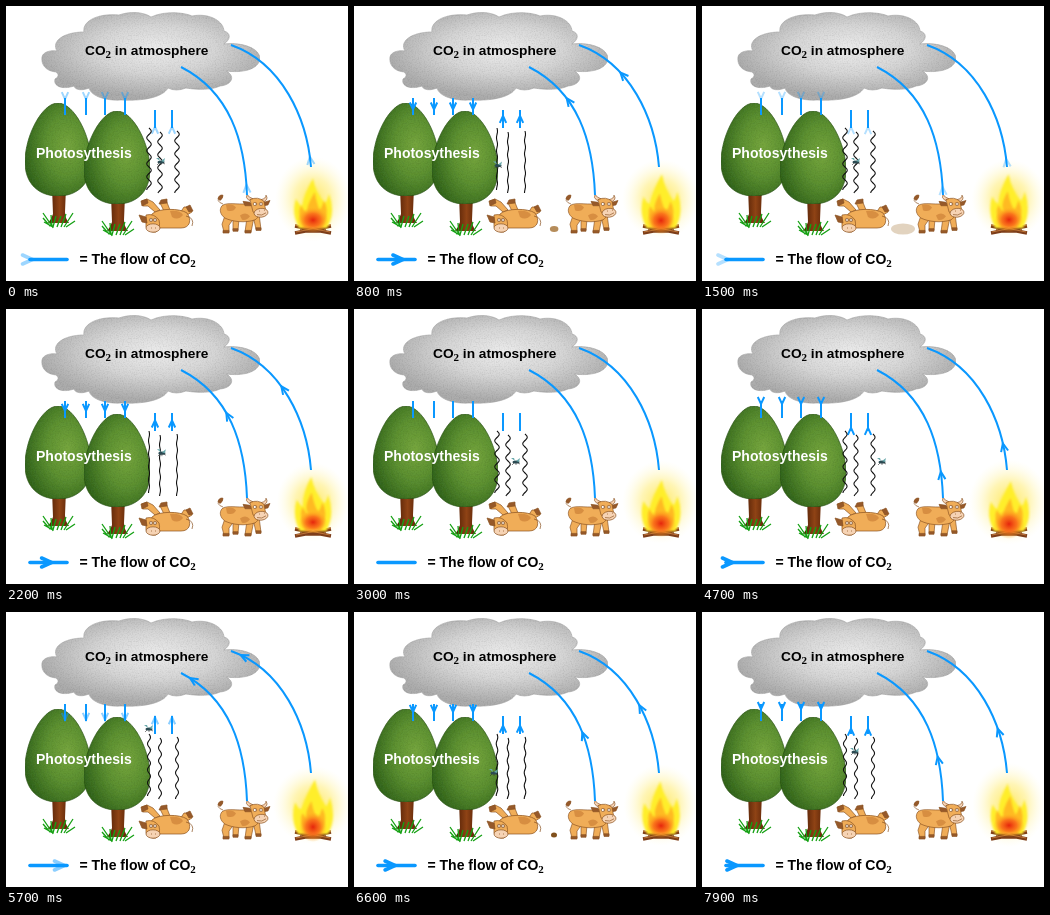
Animation, 342 px wide and 275 px high, one loop 8000 ms. Source, as an HTML page:

```html
<!DOCTYPE html>
<html lang="en">
<head>
<meta charset="utf-8">
<title>Carbon cycle</title>
<style>
html, body { margin: 0; width: 100%; height: 100%; overflow: hidden; background: #fff; }
svg { display: block; width: 342px; height: 275px; }
text { font: bold 14px "Liberation Sans", Arial, sans-serif; }
.sub { font: bold 11px "Liberation Serif", Times, serif; }
.flow, .head { fill: none; stroke: #0a98ff; stroke-width: 2; }
.wide { stroke-width: 3.6; stroke-linecap: round; }
.wave { fill: none; stroke: #111; stroke-width: 1.1; }
.cow { fill: #f0ad58; stroke: #8a5220; stroke-width: .7; stroke-linejoin: round; }
.pale { fill: #f6d3b4; }
.dark { fill: #96592a; }
.spot { fill: #cc8038; stroke: none; opacity: .7; }
.grass { fill: none; stroke: #14a012; stroke-width: 1.3; }
</style>
</head>
<body>
<svg viewBox="0 0 342 275">
  <defs>
    <radialGradient id="gray" cx=".52" cy=".42" r=".54">
      <stop offset="0" stop-color="#ececec"/><stop offset=".5" stop-color="#d6d6d6"/><stop offset="1" stop-color="#acacac"/>
    </radialGradient>
    <radialGradient id="leaf" cx=".64" cy=".46" r=".66">
      <stop offset="0" stop-color="#76a63e"/><stop offset=".5" stop-color="#5c9032"/><stop offset="1" stop-color="#34661f"/>
    </radialGradient>
    <linearGradient id="bark">
      <stop offset="0" stop-color="#4c1d05"/><stop offset=".55" stop-color="#8f4315"/><stop offset="1" stop-color="#5a2408"/>
    </linearGradient>
    <radialGradient id="glow">
      <stop offset="0" stop-color="#ffe860"/><stop offset=".5" stop-color="#fff3a8" stop-opacity=".85"/><stop offset="1" stop-color="#fffbe0" stop-opacity="0"/>
    </radialGradient>
    <radialGradient id="ember">
      <stop offset="0" stop-color="#e5260c"/><stop offset=".5" stop-color="#f9681a" stop-opacity=".85"/><stop offset="1" stop-color="#ffb020" stop-opacity="0"/>
    </radialGradient>
    <filter id="soft" x="-30%" y="-30%" width="160%" height="160%"><feGaussianBlur stdDeviation="1.2"/></filter>
    <filter id="grain" x="0" y="0" width="100%" height="100%">
      <feTurbulence type="fractalNoise" baseFrequency=".75" numOctaves="2" seed="4"/>
      <feColorMatrix values="0 0 0 0 0  0 0 0 0 0  0 0 0 0 0  .4 0 0 0 -.17"/>
      <feComposite in2="SourceGraphic" operator="in" result="n"/>
      <feMerge><feMergeNode in="SourceGraphic"/><feMergeNode in="n"/></feMerge>
    </filter>
    <g id="tree">
      <path d="M46 181 L47 208 Q45 214 42 217 L63 217 Q59 212 59 206 L60 181Z" fill="url(#bark)"/>
      <path class="grass" d="M37 207 L46 220 L45 209 M38 216 L47 221 L50 210 M51 221 L55 210 M55 221 L60 208 M58 221 L67 207 M60 221 L69 215 M44 220 L37 212"/>
      <path d="M52 97 C68 97 85 130 85 156 C85 178 71 190 52 190 C33 190 19 178 19 156 C19 130 36 97 52 97Z" fill="url(#leaf)" stroke="#2b541a" stroke-width=".7" filter="url(#grain)"/>
    </g>
  </defs>
  <rect width="342" height="275" fill="#fff"/>
  <path d="M78 26 C76 14 94 7 113 9 C124 5 138 6 145 11 C160 4 180 7 186 10 C200 7 217 13 218 25 C225 27 225 33 218 38 C236 36 254 42 254 53 C252 64 236 67 220 65 C230 70 226 79 214 80 C206 84 192 84 180 82 Q170 86 162 82 C156 92 136 95 116 94 C99 95 85 90 83 82 C76 85 69 84 68 80 C56 84 47 80 49 73 C54 70 52 68 50 66 C39 65 35 58 36 51 C37 46 44 44 51 45 C45 35 58 26 78 26Z" fill="url(#gray)" stroke="#a4a4a4" stroke-width=".6" filter="url(#grain)"/>
  <use href="#tree"/>
  <use href="#tree" x="59" y="8"/>
  <text x="79" y="49" style="font-size:13.7px">CO<tspan class="sub" dy="3">2</tspan><tspan dy="-3"> in atmosphere</tspan></text>
  <text x="30" y="151.5" fill="#fff">Photosythesis</text>
  <text x="73.5" y="258">= The flow of CO<tspan class="sub" dy="3">2</tspan></text>

  <g class="cow">
    <path d="M149 206 L142 200 L137 200 L136 195 L141 193 L147 196 L154 204Z M158 205 L154 197 L160 194 L164 204Z M174 207 L178 201 L184 201 L186 206 L181 209Z"/>
    <path class="dark" d="M136 200 L135 195 L141 193 L142 197Z M153 198 L155 194 L161 193 L161 197Z M180 201 L184 199 L187 205 L183 206Z"/>
    <path d="M146 208 C152 202 174 202 181 207 C186 214 184 222 175 222 L153 222 C145 220 142 213 146 208Z"/>
    <path class="spot" d="M164 205 Q174 204 177 209 Q172 215 166 211Z"/>
    <path d="M180 210 Q189 212 186 220" fill="none"/>
    <path d="M140 209 Q148 207 153 214 Q155 222 150 226 Q143 227 140 221Z"/>
    <path class="dark" d="M140 211 L133 209 L136 216 L141 217Z"/>
    <ellipse class="pale" cx="147" cy="222" rx="7" ry="4.2"/>
    <circle cx="145" cy="214" r="1.7" fill="#fff"/><circle cx="149" cy="214" r="1.7" fill="#fff"/>
    <path d="M145 213 v2 M149 213 v2 M145 222 h1 M149 222 h1"/>
  </g>
  <ellipse id="pat" cy="223"/>
  <g class="cow" transform="translate(-2 22) scale(1 .88)">
    <path d="M219 200 Q211 197 216 191" fill="none"/>
    <path class="dark" d="M214 194 Q215 189 219 190 Q219 194 216 196Z"/>
    <path d="M221 213 L218 223 L220 232 L225 232 L225 224 L230 216Z M229 215 L229 230 L234 230 L235 217Z M243 215 L241 232 L247 232 L250 215Z M249 213 L252 229 L257 229 L255 211Z"/>
    <path class="dark" d="M219 230 h6 v3 h-6Z M229 228 h5 v3 h-5Z M241 230 h6 v3 h-6Z M252 227 h5 v3 h-5Z"/>
    <path d="M218 202 C222 197 239 202 248 199 C257 201 257 214 251 218 C241 222 228 220 221 216 C216 212 215 206 218 202Z"/>
    <path class="spot" d="M222 201 Q229 199 232 204 Q229 210 223 207Z M236 213 Q242 208 246 214 Q243 219 238 218Z"/>
    <path class="pale" d="M245 196 Q241 193 243 189 Q245 193 249 194Z M257 195 Q262 194 262 190 Q265 195 259 198Z"/>
    <path class="dark" d="M246 198 L239 197 L241 202 L247 202Z M260 198 L266 196 L264 201 L260 202Z"/>
    <path d="M246 195 Q254 191 260 197 L262 209 Q256 215 249 209Z"/>
    <ellipse class="pale" cx="257" cy="210" rx="7" ry="5" transform="rotate(-9 257 210)"/>
    <circle cx="251" cy="200" r="1.8" fill="#fff"/><circle cx="257" cy="200" r="1.8" fill="#fff"/>
    <path d="M252 199 v2 M257 199 v2 M255 208 h1 M260 207 h1 M253 212 Q258 214 262 210" fill="none"/>
  </g>

  <ellipse id="halo" cx="307" cy="193" fill="url(#glow)"/>
  <path d="M289 220 L325 227 M325 220 L289 227 M294 225 H320" stroke="#7d3d18" stroke-width="3.4"/>
  <path d="M289 219 L324 226 M325 219 L290 226" stroke="#bd7438" stroke-width="1.1"/>
  <g filter="url(#soft)">
    <path id="outer" fill="#ffee2c"/>
    <path id="inner" fill="#ffba22"/>
  </g>
  <ellipse id="core" cx="307" fill="url(#ember)"/>

  <g id="flows"></g>
  <g id="waves"></g>
  <g id="fly">
    <ellipse rx="3.5" ry="1.6" fill="#2b4a52"/>
    <path d="M-1 -1 L-5 -4 L-2 -4Z M0 -1 L4 -4 L3 0Z" fill="#6aa9ac"/>
    <path d="M-2 1 L-4 3 M0 1 V3 M2 1 L4 2" stroke="#333" stroke-width=".6"/>
  </g>
</svg>
<script>
// CYCLE: one pass of the arrowheads; SCENE: the fly and the cow pat
const STEP = 100, FRAMES = 80, CYCLE = 15.2, SCENE = 4 * CYCLE;
const $ = id => document.getElementById(id);
const clamp = v => Math.max(0, Math.min(1, v));

function add(parent, cls, d) {
  const el = document.createElementNS("http://www.w3.org/2000/svg", "path");
  el.setAttribute("class", cls);
  if (d) el.setAttribute("d", d);
  return parent.appendChild(el);
}

function set(el, attrs) {
  for (const key in attrs) el.setAttribute(key, attrs[key]);
}

// Each flow: path, head length, head half-width, whether the head fades out, extra class
const flows = [
  ...[59, 80, 99, 119].map(x => [`M${x} 92 V109`, 7, 3.2, true]),
  ...[149, 166].map(x => [`M${x} 122 V104`, 7, 3.2, true]),
  ["M241 189 C239 135 224 86 175 61", 8, 3.6, false],
  ["M305 161 C301 112 276 57 225 39", 8, 3.6, false],
  ["M24 253.5 H61", 10, 4.5, true, "wide"]
].map(([d, len, half, fades, extra = ""]) => {
  const line = add($("flows"), `flow ${extra}`, d);
  const head = add($("flows"), `head ${extra}`, `M${-len} ${-half} L0 0 L${-len} ${half}`);
  return { line, head, fades, total: line.getTotalLength() };
});

const waves = [[143, 122, 184], [154, 126, 187], [171, 125, 187]]
  .map(([x, top, end]) => ({ x, top, end, el: add($("waves"), "wave") }));

// time in steps, x, y
const flight = [
  [0, 155, 156], [5.2, 140, 161], [15, 154, 156], [18.2, 153, 140],
  [30, 162, 153], [47, 180, 153], [57, 143, 117], [SCENE, 155, 156]
];

function sample(keys, t) {
  const i = Math.max(1, keys.findIndex(k => k[0] >= t));
  const a = keys[i - 1], b = keys[i];
  const u = (t - a[0]) / (b[0] - a[0]);
  return a.map((v, k) => v + (b[k] - v) * u);
}

function drawFlows(phase) {
  const p = (phase + .6) / 13.2;
  for (const { line, head, fades, total } of flows) {
    const at = Math.min(p, 1) * total;
    const a = line.getPointAtLength(Math.max(0, at - 2));
    const b = line.getPointAtLength(at);
    const angle = Math.atan2(b.y - a.y, b.x - a.x) * 180 / Math.PI;
    const fadeIn = clamp(.25 + phase * .5);
    const fadeOut = fades ? clamp((1.05 - p) * 4) : 1;
    set(head, {
      transform: `translate(${b.x} ${b.y}) rotate(${angle})`,
      opacity: p > 1 ? 0 : Math.min(fadeIn, fadeOut)
    });
  }
}

function drawWaves(phase) {
  const amp = 1.35 + .9 * Math.cos(phase * 2 * Math.PI / CYCLE);
  for (const w of waves) {
    let d = "";
    for (let v = w.top; v <= w.end; v++) {
      const x = w.x + amp * Math.sin((v - w.top) * Math.PI / 6.5);
      d += `${d ? "L" : "M"}${x.toFixed(2)} ${v}`;
    }
    set(w.el, { d });
  }
}

function drawFly(n) {
  const [, x, y] = sample(flight, n % SCENE);
  set($("fly"), { transform: `translate(${x} ${y})` });
}

function flame(w, top, lean) {
  const l = 307 - w, r = 307 + w, tip = 307 + lean, mid = (top + 221) / 2;
  return `M${l + 5} 222 Q${l - 3} 207 ${l + 2} ${mid - 4} Q${l + 6} ${mid + 3} ${l + 8} ${mid + 3}
    Q${tip - 9} ${top + 15} ${tip} ${top} Q${tip + 3} ${top + 15} ${r - 7} ${mid}
    Q${r - 5} ${mid - 2} ${r - 3} ${mid - 9} Q${r + 4} 207 ${r - 5} 222Z`;
}

function drawFire(n) {
  const a = Math.sin(n * 1.9), b = Math.sin(n * 2.7 + 1);
  set($("halo"), { rx: 38 + 2 * a, ry: 41 + 2 * b });
  set($("outer"), { d: flame(19 + a, 170 + 3 * b, 2 * a) });
  set($("inner"), { d: flame(13 + b, 186 + 3 * a, 2 * b) });
  set($("core"), { cy: 214 + a, rx: 15 + b, ry: 13 + 2 * a });
}

function drawPat(n) {
  const age = (n - 4 + SCENE) % SCENE;
  const grow = clamp((age - 3) / 7);
  set($("pat"), {
    cx: 200 + grow,
    rx: 3 + 9 * grow,
    ry: 2.5 + 3 * grow,
    fill: grow ? "#ad8049" : "#80501c",
    opacity: age < 13 ? 1 - .65 * grow : 0
  });
}

let shown = -1;
function tick(now) {
  const n = Math.floor(now / STEP) % FRAMES;
  if (n !== shown) {
    shown = n;
    const phase = (n + .3) % CYCLE;
    drawFlows(phase);
    drawWaves(phase);
    drawFly(n);
    drawFire(n);
    drawPat(n);
  }
  requestAnimationFrame(t => tick(Math.max(0, t - start)));
}
const start = performance.now();
tick(0);
</script>
</body>
</html>
```
